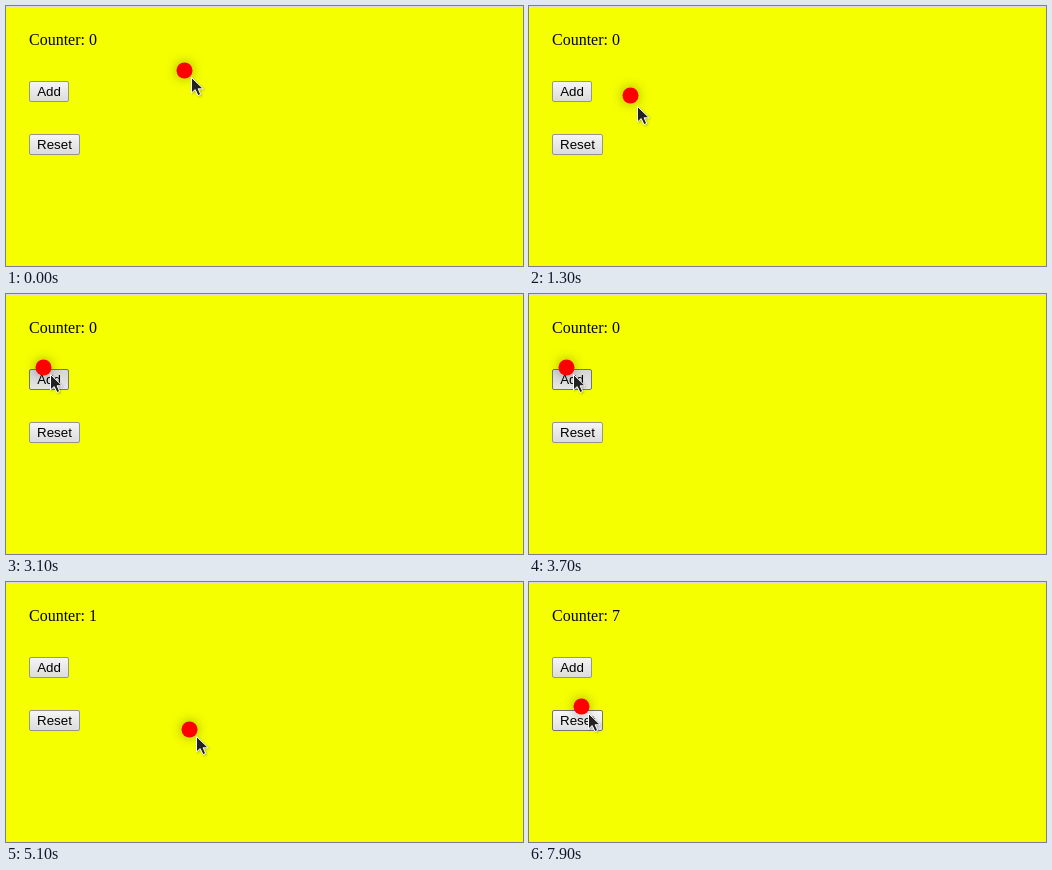
Recreate the animation shown at these times as an HTML page. Size 517 by 260 pixels, loop 8 s.

```html
<!DOCTYPE html>
<html lang="en">
<head>
<meta charset="utf-8">
<title>Counter</title>
<style>
  html, body { margin: 0; width: 100%; height: 100%; overflow: hidden; }
  body {
    position: relative;
    background: linear-gradient(#dcdcdc 1px, #f5ff00 1px);
    cursor: default;
  }
  p {
    position: absolute; left: 23px; top: 25px; margin: 0;
    font: 16px/18px "Liberation Serif", "Times New Roman", serif;
    color: #000;
  }
  button {
    position: absolute; left: 23px; height: 21px; padding: 0;
    box-sizing: border-box;
    border: 1px solid #969690; border-radius: 2px;
    background: linear-gradient(#f5f5f5, #dcdcdc);
    font: 13.333px/19px "Liberation Sans", Arial, sans-serif;
    color: #000; pointer-events: none;
  }
  #add { top: 75px; width: 40px; }
  #reset { top: 128px; width: 51px; }
  button.hover { border-color: #747470; background: linear-gradient(#f8f8f8, #e0e0e0); }
  button.down { border-color: #747470; background: linear-gradient(#d6d6d6, #e6e6e6); }
  #dot, #arrow { position: absolute; left: 0; top: 0; }
  #dot {
    width: 16px; height: 16px; margin: -8px 0 0 -8px;
    border-radius: 50%; background: #f00;
    box-shadow: 0 0 12px rgba(0, 0, 0, .35);
  }
  #arrow { overflow: visible; filter: drop-shadow(1px 1px 1px rgba(0, 0, 0, .25)); }
</style>
</head>
<body>
<p>Counter: <span id="count">0</span></p>
<button id="add">Add</button>
<button id="reset">Reset</button>
<div id="dot"></div>
<svg id="arrow" width="14" height="21">
  <path d="M-.5 1.5V17L3.2 13.6L6 19.6L8.7 18.4L6.1 12.8H11.2Z"
    fill="#222" stroke="#fff"/>
</svg>
<script>
  const LOOP = 8000, STEP = 100, LEAD = 30;

  // Pointer strokes: begin and end in ms, then the four points of a cubic curve.
  const strokes = [
    [300, 700, [186, 70], [186, 95], [170, 130], [165, 153]],
    [900, 1300, [165, 153], [150, 178], [112, 125], [109, 99]],
    [1300, 1700, [109, 99], [105, 82], [132, 88], [145, 101]],
    [1700, 2400, [145, 101], [135, 104], [60, 80], [45, 79]],
    [4000, 4700, [45, 79], [130, 55], [188, 75], [191, 153]],
    [7100, 7900, [191, 153], [185, 195], [95, 188], [60, 130]]
  ];

  const $ = id => document.getElementById(id);
  const add = $("add"), reset = $("reset"), dot = $("dot"), arrow = $("arrow"), count = $("count");
  const clamp = (v, lo, hi) => Math.max(lo, Math.min(hi, v));
  const easeOut = u => 1 - (1 - u) ** 1.25;

  function pointer(t) {
    const [from, to, a, b, c, d] = strokes.filter(s => s[0] <= t).pop() || strokes[0];
    const u = easeOut(clamp((t - from) / (to - from), 0, 1)), v = 1 - u;
    return [0, 1].map(i =>
      v ** 3 * a[i] + 3 * v * v * u * b[i] + 3 * v * u * u * c[i] + u ** 3 * d[i]);
  }

  function move(el, x, y) {
    el.style.transform = `translate(${x}px, ${y}px)`;
  }

  function over(el, x, y) {
    return x >= el.offsetLeft && x < el.offsetLeft + el.offsetWidth &&
      y >= el.offsetTop && y < el.offsetTop + el.offsetHeight;
  }

  function draw(now) {
    const step = Math.floor(now % LOOP / STEP), t = step * STEP;
    const [x, y] = pointer(t);
    move(arrow, Math.round(x), Math.round(y));

    // The dot runs slightly ahead of the pointer.
    const [dx, dy] = pointer(t + LEAD);
    move(dot, Math.round(dx) - 7.5, Math.round(dy) - 5.5);

    const pressed = t >= 3100 && t < 4000 && step % 2 === 1;
    add.className = pressed ? "down" : over(add, x, y) ? "hover" : "";
    reset.className = over(reset, x, y) ? "hover" : "";
    count.textContent = clamp(Math.floor((t - 5100) / 150) + 1, 0, 7);
  }

  const start = performance.now();
  function tick() {
    draw(performance.now() - start);
    requestAnimationFrame(tick);
  }
  tick();
</script>
</body>
</html>
```
